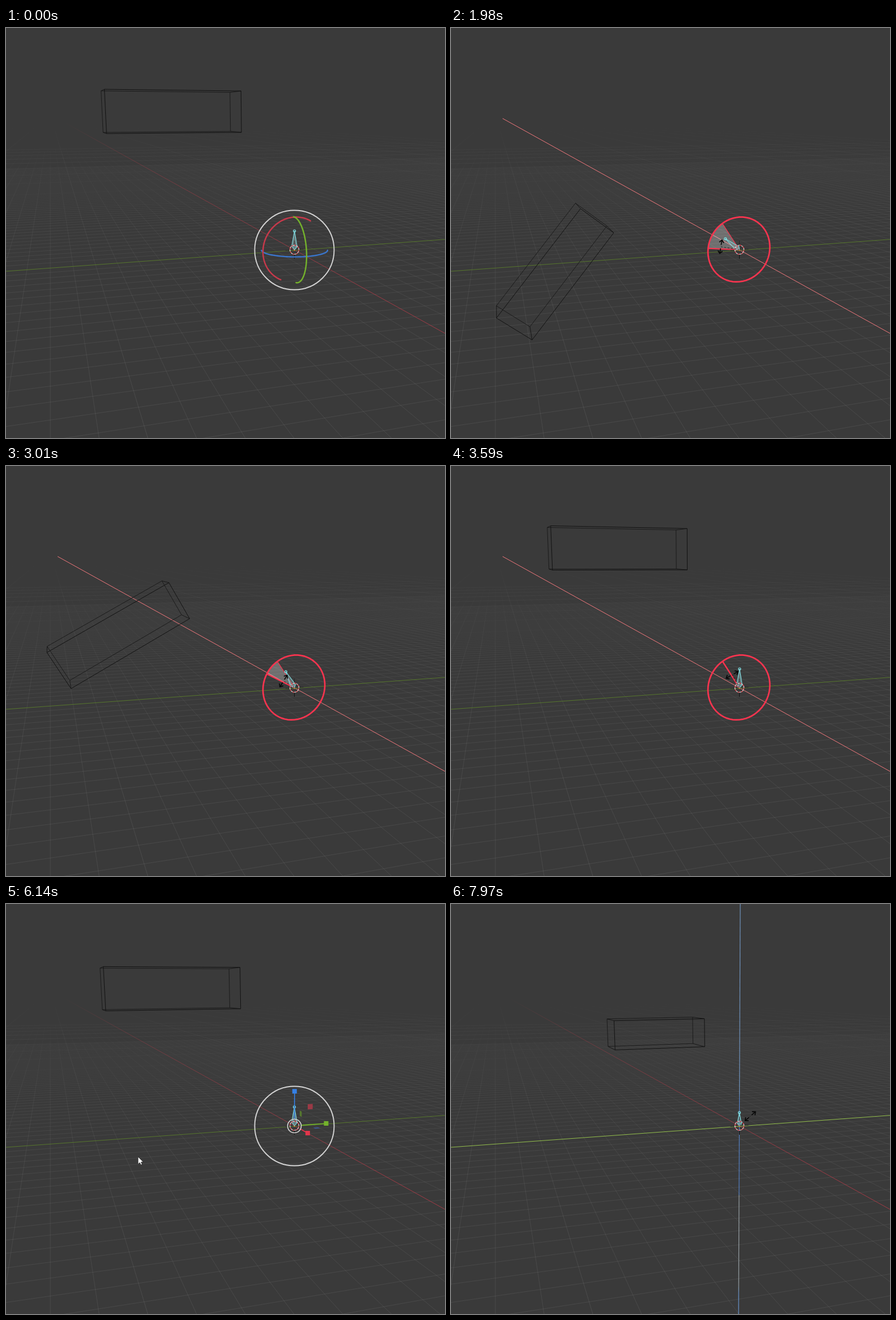
Recreate the animation shown at these times as an HTML page with a canvas. Size 774 by 723 pixels, loop 8000 ms.

```html
<!DOCTYPE html>
<html lang="en">
<head>
<meta charset="utf-8">
<title>Viewport gizmos</title>
<style>
html, body { margin: 0; width: 100%; height: 100%; overflow: hidden; background: #3a3a3a; }
canvas { display: block; }
</style>
</head>
<body>
<canvas id="view" width="774" height="723"></canvas>
<script>
const W = 774, H = 723, LOOP = 8000, RAD = Math.PI / 180;
const canvas = document.getElementById('view');
let g = canvas.getContext('2d');

// Camera: homogeneous image of the origin and of one unit along each axis.
const O = [508.5, 391];
const VX = [78, 153], VY = [3780, 153], VZ = [482, 6559];
const KX = 0.0276, KY = 0.00967, KZ = -0.00536;

function project([x, y, z]) {
  const a = KX * x, b = KY * y, c = KZ * z, w = 1 + a + b + c;
  return [0, 1].map(i => (O[i] + a * VX[i] + b * VY[i] + c * VZ[i]) / w);
}

// Pose of the bone: turn about X, then scale in the YZ plane.
function posed([x, y, z], turn, size) {
  const c = Math.cos(turn * RAD), s = Math.sin(turn * RAD);
  return project([x, size * (y * c - z * s), size * (z * c + y * s)]);
}

function track(keys, t) {
  if (t <= keys[0][0]) return keys[0][1];
  for (let i = 1; i < keys.length; i++) {
    const [t0, v0] = keys[i - 1], [t1, v1] = keys[i];
    if (t < t1) return v0 + (v1 - v0) * (t - t0) / (t1 - t0);
  }
  return keys[keys.length - 1][1];
}

const TURN = [[1540, 0], [1700, 9], [1900, 36], [2120, 76], [2280, 90], [2570, 90],
  [2650, 80.5], [2690, 80.5], [2860, 52], [3040, 24], [3220, 6], [3540, 6], [3590, -0.4],
  [3640, -0.4], [3760, -4.6], [4310, -4.6], [4420, 0.35]];
const SIZE = [[7090, 1], [7290, 0.9], [7590, 0.9], [7970, 0.7]];
const REACH = [[1540, 51], [2280, 21], [2650, 20], [3220, 24], [3590, 26]];
const PATHS = [
  { x: [[370, 736], [770, 484]], y: [[370, 538], [770, 346]], from: 370, to: 1540 },
  { x: [[4840, 496], [4880, 330], [4955, 106]], y: [[4840, 369], [4880, 425], [4955, 517]], from: 4660, to: 5010 },
  { x: [[5840, 43], [6620, 535]], y: [[5840, 497], [6620, 364]], from: 5840, to: 7080 }
];

function trace(points, close) {
  g.beginPath();
  points.forEach(p => g.lineTo(p[0], p[1]));
  if (close) g.closePath();
}
function stroke(points, color, width = 1, close = false) {
  trace(points, close);
  g.strokeStyle = color;
  g.lineWidth = width;
  g.stroke();
}
function fill(points, color) {
  trace(points, true);
  g.fillStyle = color;
  g.fill();
}
function circle(x, y, r, color, width) {
  g.beginPath();
  g.arc(x, y, r, 0, 7);
  g.strokeStyle = color;
  g.lineWidth = width;
  g.stroke();
}
function fade(rgb, stops) {
  const grad = g.createLinearGradient(0, 0, 0, H);
  stops.forEach(([y, a]) => grad.addColorStop(y / H, `rgba(${rgb},${a})`));
  return grad;
}

function drawFloor() {
  g.fillStyle = '#3a3a3a';
  g.fillRect(0, 0, W, H);
  const minor = fade('255,255,255', [[205, 0], [250, 0.018], [320, 0.043], [440, 0.062], [H, 0.075]]);
  const major = fade('255,255,255', [[172, 0], [230, 0.035], [340, 0.055], [H, 0.085]]);
  const shade = k => k % 10 ? minor : major;
  for (let k = -60; k <= 90; k++) {
    if (k) stroke([VX, [1109 + 85.9 * k, H]], shade(k));
  }
  for (let k = -20; k <= 110; k++) {
    if (!k || (k > 60 && k % 10)) continue;
    const [u, v] = project([k, 0, 0]), m = (v - VY[1]) / (VY[0] - u);
    const at = x => [x, VY[1] + m * (VY[0] - x)];
    stroke([at(0), at(W)], shade(k));
  }
}

const floor = document.createElement('canvas');
floor.width = W;
floor.height = H;
const screen = g;
g = floor.getContext('2d');
drawFloor();
g = screen;

const RED_END = [774, 538.5], GREEN_LINE = [[0, 429], [774, 372.8]];

function drawAxes(mode) {
  if (mode === 'turn') stroke([[91, 159.5], RED_END], '#f0777c');
  else stroke([[104, 167], RED_END], fade('168,58,70', [[167, 0], [230, 0.4], [380, 0.8], [540, 0.95]]));
  stroke(GREEN_LINE, mode === 'size' ? '#92bd4c' : '#56752d', 1.1);
  if (mode === 'size') {
    const grad = g.createLinearGradient(0, 0, 0, H);
    [[0, '#7399c6'], [0.46, '#7399c6'], [0.475, '#5585cf'], [0.708, '#5585cf'],
     [0.712, '#9ba5aa'], [0.93, '#9ba5aa'], [0.95, '#6c9bd8'], [1, '#6c9bd8']]
      .forEach(s => grad.addColorStop(...s));
    stroke([[510, 0], [507, H]], grad, 1.1);
  }
}

function drawBox(turn, size) {
  const at = (x, i, j) => posed([x, [-9.3, -3.09][i], [6.11, 8.03][j]], turn, size);
  const face = x => [at(x, 0, 0), at(x, 1, 0), at(x, 1, 1), at(x, 0, 1)];
  const near = face(-1), far = face(1);
  stroke(far, '#181818', 0.9, true);
  stroke(near, '#121212', 1, true);
  near.forEach((p, i) => stroke([p, far[i]], '#141414', 0.9));
}

function drawBone(turn, size) {
  const at = (x, y, z) => posed([x, y, z], turn, size);
  const d = 0.11, root = at(0, 0, 0), tip = at(0, 0, 1);
  const ring = [[d, -d], [d, d], [-d, d], [-d, -d]].map(([x, y]) => at(x, y, 0.17));
  fill([tip, ring[0], root, ring[2]], 'rgba(135,145,145,0.55)');
  ring.forEach((p, i) => stroke([tip, p, root], i % 2 ? 'rgba(120,205,210,0.45)' : '#80dfe4', i % 2 ? 0.7 : 1.1));
  stroke(ring, 'rgba(120,205,210,0.6)', 0.7, true);
  circle(tip[0], tip[1], 2, '#80e4e8', 1.2);
}

function drawOrigin() {
  const [x, y] = O;
  stroke([[x, y + 9], [x, y + 16]], '#111', 1);
  stroke([[x, y - 16], [x, y - 9]], 'rgba(20,20,20,0.6)', 1);
  stroke([[x - 16, y + 1.2], [x - 9, y + 0.7]], '#303030', 1.5);
  stroke([[x + 9, y - 0.7], [x + 16, y - 1.2]], '#303030', 1.5);
  circle(x, y, 8, '#e8e8e8', 1.2);
  g.setLineDash([3.14, 3.14]);
  circle(x, y, 8, '#d8323c', 1.3);
  g.setLineDash([]);
  g.fillStyle = '#d98a35';
  g.fillRect(x - 1, y, 2, 2);
}

// Ring of the turning gizmo: angles in degrees, place() maps (sin, cos) to a point.
const R = 1.725;
function arc(from, to, place) {
  const points = [];
  for (let i = 0; i <= 60; i++) {
    const a = (from + (to - from) * i / 60) * RAD;
    points.push(project(place(R * Math.sin(a), R * Math.cos(a))));
  }
  return points;
}
const aroundX = (s, c) => [0, -s, c];
const aroundY = (s, c) => [-s, 0, c];
const aroundZ = (s, c) => [-c, s, 0];

function drawTurnGizmo(hot) {
  g.lineCap = 'round';
  stroke(arc(-104, 66, aroundZ), '#3a76cc', 2.4);
  stroke(arc(-31, 154, aroundX), hot ? '#ff3550' : '#c7394b', 2.5);
  stroke(arc(-5, 171, aroundY), '#74b22c', 2.5);
  g.lineCap = 'butt';
  circle(508.5, 391.5, 70, '#d4d4d4', 1.9);
}

function drawTurnDial(turn) {
  const start = 33, wedge = arc(start, start + turn, aroundX);
  fill([O, ...wedge], 'rgba(255,255,255,0.27)');
  stroke([O, wedge[0]], '#f8344f', turn > 20 ? 1.2 : 2);
  stroke([O, wedge[60]], '#f8344f', 2.2);
  stroke(arc(0, 360, aroundX), '#f8344f', 2.7, true);
}

function drawSizeGizmo(hot) {
  const h = 0.14;
  const quad = (make, color) =>
    fill([[-h, -h], [h, -h], [h, h], [-h, h]].map(([a, b]) => project(make(a, b))), color);
  const handle = (axis, color) => {
    const end = project(axis), dx = end[0] - O[0], dy = end[1] - O[1], d = 12 / Math.hypot(dx, dy);
    stroke([[O[0] + dx * d, O[1] + dy * d], end], color, 1.6);
    g.fillStyle = color;
    g.fillRect(end[0] - 4, end[1] - 4, 8, 8);
  };
  quad((a, b) => [-0.9 + a, 0, 0.8 + b], '#55772f');
  quad((a, b) => [-0.9 + a, 0.88 + b, 0], '#3d5794');
  quad((a, b) => [0, 0.88 + a, 0.96 + b], hot ? '#d93a4c' : '#9b3a46');
  handle([0, 1.8, 0], '#74b22c');
  handle([0, 0, 1.82], '#3580e6');
  handle([-1.87, 0, 0], '#e0364b');
  circle(508.5, 391.5, 12, '#d4d4d4', 1.7);
  circle(508.5, 391.5, 70, '#d4d4d4', 1.9);
}

function drawPointer(x, y) {
  const shape = [[0, 0], [0, 13], [3, 10.3], [5, 14.6], [7.2, 13.6], [5.3, 9.4], [9.3, 9.2]]
    .map(p => [x + p[0], y + p[1]]);
  fill(shape, '#fff');
  stroke(shape, '#222', 0.8, true);
}

function drawDragCursor(x, y, angle) {
  g.setLineDash([3, 3]);
  stroke([O, [x, y]], 'rgba(15,15,15,0.8)', 1);
  g.setLineDash([]);
  g.save();
  g.translate(x, y);
  g.rotate(angle);
  for (const s of [-1, 1]) {
    stroke([[3 * s, 0], [12 * s, 0]], '#080808', 1.6);
    stroke([[7.5 * s, -4], [12 * s, 0], [7.5 * s, 4]], '#080808', 1.8);
  }
  g.restore();
}

function drawTip(text, x, y, width, alpha) {
  if (alpha <= 0) return;
  g.save();
  g.globalAlpha = alpha;
  g.fillStyle = '#1a1a1a';
  g.shadowColor = 'rgba(0,0,0,0.35)';
  g.shadowBlur = 3;
  g.beginPath();
  g.roundRect(x, y, width, 25, 4);
  g.fill();
  g.shadowBlur = 0;
  g.fillStyle = '#d2d2d2';
  g.font = '8.5px "Noto Sans", "Open Sans", sans-serif';
  g.fillText(text, x + 10, y + 15);
  g.restore();
}

function draw(t) {
  const turn = track(TURN, t), size = track(SIZE, t);
  const mode = t >= 1540 && t < 4660 ? 'turn' : t >= 7080 ? 'size' : '';
  g.drawImage(floor, 0, 0);
  drawAxes(mode);
  drawBox(turn, size);
  if (mode === 'turn') drawTurnDial(turn);
  drawBone(turn, size);
  drawOrigin();
  if (!mode) {
    if (t < 5840) drawTurnGizmo((t >= 740 && t < 1540) || (t >= 4660 && t < 4880));
    else drawSizeGizmo(t >= 6600);
  }
  if (t < 1540) drawTip('Rotate selected items', 461, 349, 106.5, track([[980, 0], [1200, 1]], t));
  if (!mode && t > 6000) drawTip('Scale (resize) selected items', 512.5, 366, 132.5, track([[6900, 0], [6980, 1]], t));

  const path = PATHS.find(p => t >= p.from && t < p.to);
  if (path) drawPointer(track(path.x, t), track(path.y, t));
  if (mode === 'turn') {
    const a = (-120 - turn) * RAD, r = track(REACH, t);
    drawDragCursor(O[0] + r * Math.cos(a), O[1] + r * Math.sin(a), a + Math.PI / 2);
  }
  if (mode === 'size') drawDragCursor(O[0] + 27.5 * size, O[1] - 24 * size, Math.atan2(-24, 27.5));
}

const begin = performance.now();
function tick() {
  draw((performance.now() - begin) % LOOP);
  requestAnimationFrame(tick);
}
tick();
</script>
</body>
</html>
```
